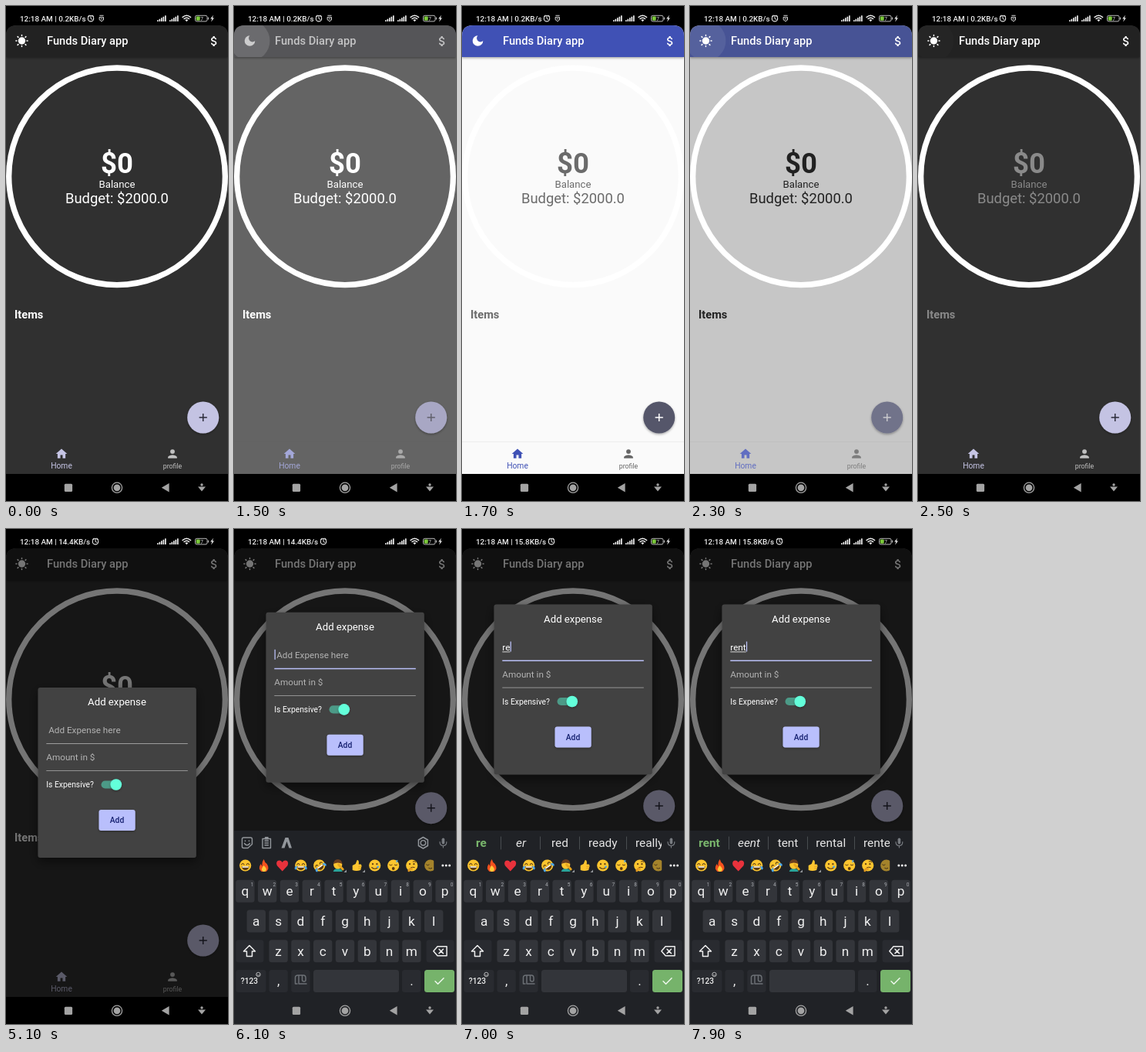
Recreate the animation shown at these times as an HTML page. Size 288x640 px, loop 8000 ms.

```html
<!DOCTYPE html>
<html lang="en">
<head>
<meta charset="utf-8">
<title>Expense app</title>
<style>
html, body { margin: 0; width: 100%; height: 100%; overflow: hidden; background: #000; }
svg { display: block; width: 100vw; height: 100vh; }
text { font-family: Roboto, "Noto Sans", sans-serif; white-space: pre; }
.mid { text-anchor: middle; }
.line { fill: none; stroke-linecap: round; stroke-linejoin: round; }
</style>
</head>
<body>
<svg id="stage" viewBox="0 0 288 640"></svg>
<script>
const LOOP = 8000;
const stage = document.getElementById('stage');

// markup helpers
const label = (x, y, size, str, attrs = '') => `<text x="${x}" y="${y}" font-size="${size}" ${attrs}>${str}</text>`;
const box = (x, y, w, h, r, fill, attrs = '') => `<rect x="${x}" y="${y}" width="${w}" height="${h}" rx="${r}" fill="${fill}" ${attrs}/>`;
const dot = (x, y, r, fill, attrs = '') => `<circle cx="${x}" cy="${y}" r="${r}" fill="${fill}" ${attrs}/>`;
const line = (d, color, width = 1, attrs = '') => `<path class="line" d="${d}" stroke="${color}" stroke-width="${width}" ${attrs}/>`;
const shape = (d, fill, attrs = '') => `<path d="${d}" fill="${fill}" ${attrs}/>`;
const group = (x, y, body, attrs = '') => `<g transform="translate(${x} ${y})" ${attrs}>${body}</g>`;
const icon = (id, x, y, d) => `<path id="${id}" d="${d}" transform="translate(${x} ${y}) scale(.733) translate(-12 -12)"/>`;
const repeat = (n, fn) => Array.from({ length: n }, (_, i) => fn(i)).join('');

// status bar
const bars = x => repeat(5, i => box(x + i * 2.5, 18.3 - i * 1.5, 1.7, 1.7 + i * 1.5, .3, '#eee'));
const statusBar = `
  ${label(18, 19.8, 9.9, '', 'id="clock" fill="#eee" font-weight="500"')}
  <g id="alarm">${line('M110 13.6V16.4L112 17.4M106.2 13.6L108 12M113.8 13.6L112 12', '#eee', 1)}
    ${dot(110, 16.2, 3.7, 'none', 'stroke="#eee" stroke-width="1.1"')}</g>
  <g id="badge">${line('M121.8 12.3H126.2M121.5 14.5H126.5V18L124 19.8L121.5 18ZM123 16.7H125', '#ddd', 1)}</g>
  ${bars(196)}${bars(212)}
  ${line('M229 14.6Q234.3 10 239.6 14.6M231 16.6Q234.3 13.9 237.6 16.6', '#eee', 1.4)}
  ${shape('M232.3 18L234.3 20.2L236.3 18Q234.3 16.6 232.3 18Z', '#eee')}
  ${box(245.5, 12.3, 15.5, 7.6, 2, 'none', 'stroke="#bbb"')}${box(246.7, 13.5, 5, 5.2, 1, '#7cc93c')}
  ${box(261.8, 14.6, 1.2, 3, .4, '#bbb')}${label(254, 18.6, 6.5, '7', 'fill="#ddd" class="mid"')}
  ${shape('M269 11.8L265.2 16.6H267.4L266 20.4L270 15.4H267.8Z', '#eee')}`;

// main screen
const sun = dot(0, 0, 4.7, '#fff') + line(repeat(8, i => {
  const c = Math.cos(i * Math.PI / 4), s = Math.sin(i * Math.PI / 4);
  return `M${c * 6.5} ${s * 6.5}L${c * 7.6} ${s * 7.6}`;
}), '#fff', 1.5);
const moon = shape('M0 -6.8A6.8 6.8 0 1 0 6.8 0A4.2 4.2 0 1 1 0 -6.8Z', '#fff');
const HOME = 'M10 20v-6h4v6h5v-8h3L12 3 2 12h3v8z';
const PERSON = 'M12 12a4 4 0 1 0 0-8 4 4 0 0 0 0 8zm0 2c-2.67 0-8 1.34-8 4v2h16v-2c0-2.66-5.33-4-8-4z';
const DOLLAR = 'M11.8 10.9c-2.27-.59-3-1.2-3-2.15 0-1.09 1.01-1.85 2.7-1.85 1.78 0 2.44.85 2.5 2.1h2.21c-.07-1.72-1.12-3.3-3.21-3.81V3h-3v2.16c-1.94.42-3.5 1.68-3.5 3.61 0 2.31 1.91 3.46 4.7 4.13 2.5.6 3 1.48 3 2.41 0 .69-.49 1.79-2.7 1.79-2.06 0-2.87-.92-2.98-2.1h-2.2c.12 2.19 1.76 3.42 3.68 3.83V21h3v-2.15c1.95-.37 3.5-1.5 3.5-3.55 0-2.84-2.43-3.81-4.7-4.4z';
const app = `<g clip-path="url(#screen)">
  ${box(0, 25, 288, 580, 0, '#303030', 'id="page"')}
  ${dot(144, 220.3, 140.3, 'none', 'stroke="#fff" stroke-width="7.3"')}
  <g id="copy">
    ${label(144, 215.5, 36.6, '$0', 'class="mid" font-weight="700"')}
    ${label(144, 235, 13.2, 'Balance', 'class="mid"')}
    ${label(144, 255, 18.4, 'Budget: $2000.0', 'class="mid"')}
    ${label(11, 404, 14.66, 'Items', 'font-weight="700"')}
  </g>
  ${box(0, 564, 288, 41, 0, '#303030', 'id="tabs"')}
  ${box(0, 563, 288, 1, 0, '#000', 'id="tabEdge"')}
  <g id="homeTab" class="mid">${icon('homeIcon', 72, 579, HOME)}${label(72, 597.5, 10.3, 'Home')}</g>
  <g id="profileTab" class="mid">${icon('profileIcon', 216, 579, PERSON)}${label(216, 597.5, 8.8, 'profile')}</g>
  ${box(0, 25, 288, 41, 0, '#212124', 'id="bar" filter="url(#soft)"')}
  ${dot(20.5, 45, 26, '#fff', 'id="ripple" clip-path="url(#barClip)"')}
  <g id="barContent" fill="#fff">
    <g id="sun" transform="translate(20.5 45)">${sun}</g><g id="moon" transform="translate(20.5 45)">${moon}</g>
    ${label(53, 50.3, 14.66, 'Funds Diary app', 'font-weight="500"')}
    ${icon('money', 270, 45.5, DOLLAR)}
  </g>
  <g id="fab"><g filter="url(#soft)">${dot(0, 0, 20.5, '#c4c3e3', 'id="fabDisc"')}</g>
    ${dot(0, 0, 20.5, '#fff', 'id="fabRipple"')}
    <path id="plus" class="line" d="M-5.1 0H5.1M0 -5.1V5.1" stroke-width="1.5" style="stroke-linecap:butt"/></g>
  ${box(0, 25, 288, 580, 0, '#000', 'id="scrim"')}
</g>`;

const dialog = `<g id="dialog">
  ${box(41.5, 205, 205.3, 220, 3, '#424242', 'filter="url(#deep)"')}
  ${label(144, 228.3, 13.2, 'Add expense', 'class="mid" fill="#fff"')}
  ${label(55.2, 264, 11.73, 'Add Expense here', 'id="hint" fill="#b3b3b3"')}
  ${label(52.3, 264, 11.73, '', 'id="typed" fill="#fff"')}
  ${box(52.3, 266, 0, .8, 0, '#fff', 'id="composing"')}
  ${box(52.5, 253, 1.3, 13, 0, '#b9bff5', 'id="caret"')}
  ${box(52.3, 277, 183.5, .8, 0, '#b3b3b3', 'id="underline"')}
  ${label(52.3, 299, 11.73, 'Amount in $', 'fill="#b3b3b3"')}${box(52.3, 312.2, 183.5, .8, 0, '#a8a8a8')}
  ${label(52.3, 334, 10.3, 'Is Expensive?', 'fill="#fff"')}
  ${box(123.5, 325.4, 24, 10.2, 5.1, '#4c9a87')}${dot(142.8, 330.5, 7.3, '#64ffda', 'filter="url(#soft)"')}
  ${box(120.5, 363, 47.2, 27, 3, '#b9bffc', 'filter="url(#soft)"')}
  ${label(144, 380.2, 10.3, 'Add', 'class="mid" fill="#15206f" font-weight="500"')}
</g>`;

// emoji row
const INK = '#5a3a12', TEAR = '#4aa8f0';
const face = body => dot(0, 0, 7.6, '#fdc52f') + body;
const eyes = dot(-2.7, -1.8, 1.1, INK) + dot(2.7, -1.8, 1.1, INK);
const squint = line('M-5 -1Q-3.2 -4 -1.6 -1M1.6 -1Q3.2 -4 5 -1', INK, 1.1);
const grin = shape('M-5 1.2H5Q4 6 0 6Q-4 6 -5 1.2Z', INK) + box(-4.2, 1.2, 8.4, 1.5, .5, '#fff');
const tears = shape('M-5 0Q-10 3 -7 5.5Q-4.5 5 -5 0ZM5 0Q10 3 7 5.5Q4.5 5 5 0Z', TEAR);
const hand = 'M-5 0L-1 -2L1 -7Q4 -7 3 -1.5H6Q7.5 0 6.5 2L5.5 6Q0 8 -5 6Z';
const emojis = [
  face(squint + grin),
  shape('M0 -8Q1 -4 4 -2Q8 4 3 8H-3Q-8 4 -4 -2Q-3 0 -2 1Q-3 -4 0 -8Z', '#f4511e') + shape('M0 0Q6 6 1 8H-1Q-5 5 0 0Z', '#ffca3a'),
  shape('M0 7.5L-6.6 .5C-10 -6 -3 -9 0 -4C3 -9 10 -6 6.6 .5Z', '#e8323c'),
  face(squint + grin + tears),
  `<g transform="rotate(-35)">${face(squint + grin + tears)}</g>`,
  shape('M-6 8Q-5 4 0 4Q5 4 6 8Z', '#28a39a') + dot(0, -1, 5.6, '#fdc52f') + shape('M-5.8 -2Q-5 -8 0 -8Q5 -8 5.8 -2Q0 -5 -5.8 -2Z', '#6b3f20') + line('M6.5 5L1 -1', '#e6a51f', 3),
  shape(hand, '#fdc52f') + line('M2.8 1.3H6.5M2.8 3.7H6', '#d99a1f', .7),
  face(eyes + line('M-4 2.5Q0 6 4 2.5', INK, 1.1) + dot(3.8, 1.8, 1.4, TEAR)),
  face(line('M-5 -.8Q-3.3 .8 -1.6 -.8M1.6 -.8Q3.3 .8 5 -.8', INK, 1) + dot(0, 4, 1.9, INK) + label(3, -4, 6, 'z', `fill="${TEAR}" font-weight="700"`)),
  face(eyes + line('M-1.5 3Q1 1.5 3.5 2.5M1.5 -5Q3.5 -6 5 -4.5', INK, 1) + line('M-4 7L-2.5 4.5L0 4.5', '#e59b20', 2.6)),
  face(line('M-5 -1Q-3.3 1 -1.6 -1M-2 3.5Q0 5 2 3.5', INK, 1))
];

// keyboard, drawn with its top edge at y = 0
const key = (x, y, ch) => box(x - 12.2, y - 14.5, 24.4, 29, 3.5, '#33353a') + label(x, y + 6, 17.2, ch, 'class="mid" fill="#f1f1f1"');
const row = (chars, x0, y) => repeat(chars.length, i => key(x0 + 28.8 * i, y, chars[i]));
const GREY = '#92969b';
const mic = box(269.6, 9.5, 3.6, 8, 1.8, '#777b80') + line('M267 14.5Q267 19.5 271.4 19.5Q275.8 19.5 275.8 14.5M271.4 19.5V22', '#777b80', 1.2);
const keyboard = `<g id="keyboard">
  ${box(0, 0, 288, 250, 0, '#202226')}
  <g id="tools">
    ${line('M10.5 11V20.5Q10.5 22.5 12.5 22.5H18L23.5 17.5V11Q23.5 9 21.5 9H12.5Q10.5 9 10.5 11ZM13.5 16.5Q17 21 20.5 16.5M14.5 13V13.6M19.5 13V13.6', GREY, 1.4)}
    ${line('M37 10.5H47.5V22.5H37ZM40 13.3H44.5M40 16H44.5M40 18.8H44.5', GREY, 1.4)}${box(39.8, 8, 5, 3.4, 1, GREY)}
    ${shape('M66.5 9H70.5L75 22.5H71.5L68.5 14L65.5 22.5H61.5Z', GREY)}
    ${line('M245.4 8.5L251.4 12V19.5L245.4 23L239.4 19.5V12Z', GREY, 1.5)}${dot(245.4, 15.8, 3.2, 'none', `stroke="${GREY}" stroke-width="1.4"`)}
  </g>
  <g id="suggestions">
    ${line([50.5, 101.5, 152.5, 213.5].map(x => `M${x} 8V24`).join(''), '#55585c', .8)}
    <g clip-path="url(#wordClip)">${[25, 76.5, 127, 182.7, 225].map((x, i) => label(x, 21, 15.4, '',
      `class="word${i < 4 ? ' mid' : ''}" fill="${i ? '#e6e6e6' : '#79b56c'}" ${i ? '' : 'font-weight="700"'} ${i === 1 ? 'font-style="italic"' : ''}`)).join('')}</g>
  </g>
  ${mic}
  ${emojis.map((e, i) => group(14.7 + 24 * i, 45, e, i === 10 ? 'opacity=".6" clip-path="url(#edgeClip)"' : '')).join('')}
  ${[146, 170].map(x => shape(`M${x} 54V50.5L${x - 3.5} 54Z`, GREY)).join('')}
  ${repeat(3, i => dot(270.8 + 4.4 * i, 45, 1.5, '#eee'))}
  ${row('qwertyuiop', 14.4, 78.3)}
  ${repeat(10, i => label(23.5 + 28.8 * i, 71.5, 6.5, (i + 1) % 10, 'class="mid" fill="#a8abb0"'))}
  ${row('asdfghjkl', 28.8, 117)}${row('zxcvbnm', 57.6, 155.7)}
  ${box(2.5, 141.2, 36, 29, 3.5, '#292b30')}${box(249.5, 141.2, 36, 29, 3.5, '#292b30')}
  ${line('M20 148.5L12.5 156H16.5V162.5H23.5V156H27.5Z', '#eee', 1.5)}
  ${line('M264 149.8H276V161.8H264L258.8 155.8ZM266 153.2L271.4 158.6M271.4 153.2L266 158.6', '#eee', 1.5)}
  ${box(2.5, 180, 39, 29, 3.5, '#292b30')}${label(20, 198.3, 10.2, '?123', 'class="mid" fill="#eee" font-weight="500"')}
  ${dot(31.5, 186, 2.7, 'none', 'stroke="#ddd" stroke-width=".8"')}${line('M30 186.6Q31.5 188.4 33 186.6', '#ddd', .7)}
  ${box(45.4, 180, 24.4, 29, 3.5, '#292b30')}${label(57.6, 199.5, 17, ',', 'class="mid" fill="#eee"')}
  ${box(74.2, 180, 24.4, 29, 3.5, '#292b30')}
  ${line('M82 198H79.5V190Q79.5 187 83 187H90Q93 187 93 190.5V193Q93 195 91 195Q88.5 195 88.5 193V187.5M84 187.5V198H94', '#6c7075', 1.5)}
  ${box(103, 180, 111, 29, 3.5, '#33353a')}
  ${box(218, 180, 24.4, 29, 3.5, '#292b30')}${label(230.4, 199.5, 17, '.', 'class="mid" fill="#eee"')}
  ${box(247, 180, 39, 29, 3.5, '#76b36b')}${line('M261 194.8L264.5 198.2L272 190.8', '#eef7ec', 1.5)}
</g>`;

const systemBar = `${box(0, 605, 288, 35, 0, '#000', 'id="systemBack"')}
  ${box(75.8, 617.7, 10.3, 10.3, 1.5, '#a3a3a3')}
  ${dot(144, 622.8, 6.6, 'none', 'stroke="#a3a3a3" stroke-width="1.3"')}${dot(144, 622.8, 4.4, '#a3a3a3')}
  ${shape('M201.8 622.8L211.6 617V628.6Z', '#a3a3a3')}
  ${shape('M249 621.5H259L254 627.5Z', '#a3a3a3')}${dot(254, 619, 1.7, '#a3a3a3')}`;

const clip = (id, body) => `<clipPath id="${id}">${body}</clipPath>`;
const shadow = (id, dy, blur, alpha) => `<filter id="${id}" x="-30%" y="-30%" width="160%" height="170%"><feDropShadow dx="0" dy="${dy}" stdDeviation="${blur}" flood-opacity="${alpha}"/></filter>`;
stage.innerHTML = `<defs>
  ${clip('screen', '<path d="M0 605V39Q0 25 14 25H274Q288 25 288 39V605Z"/>')}
  ${clip('barClip', box(0, 25, 288, 41, 0, '#000'))}${clip('wordClip', box(0, 0, 259, 34, 0, '#000'))}
  ${clip('edgeClip', box(-8, -9, 12.5, 18, 0, '#000'))}
  ${shadow('soft', 1.3, 1.6, .35)}${shadow('deep', 5, 7, .5)}
  </defs>${box(0, 0, 288, 640, 0, '#000')}${statusBar}${app}${dialog}${keyboard}${systemBar}`;

// animation
const el = Object.fromEntries([...stage.querySelectorAll('[id]')].map(n => [n.id, n]));
const words = [...stage.querySelectorAll('.word')];
const set = (id, attrs) => { for (const k in attrs) el[id].setAttribute(k, attrs[k]); };
const show = (id, on) => set(id, { opacity: +on });
const ramp = (t, a, b) => Math.min(1, Math.max(0, (t - a) / (b - a)));
const easeOut = x => 1 - (1 - x) ** 3;
const lerp = (a, b, k) => a + (b - a) * k;
const mix = (a, b, k) => {
  const part = (c, i) => parseInt(c.slice(1 + 2 * i, 3 + 2 * i), 16);
  return '#' + [0, 1, 2].map(i => Math.round(lerp(part(a, i), part(b, i), k)).toString(16).padStart(2, '0')).join('');
};

const KEY_TIMES = [6620, 6920, 7220, 7520];
const SUGGESTIONS = [
  ['r', 're', 'are', 'right', 'really'],
  ['re', 'er', 'red', 'ready', 'really'],
  ['ren', 'en', 'ten', 'rent', 'rental'],
  ['rent', 'eent', 'tent', 'rental', 'rente']
];

function drawTheme(t) {
  const k = ramp(t, 1450, 1650) - ramp(t, 2250, 2450);
  const ink = ramp(t, 1600, 1752) - ramp(t, 2430, 2580);
  const page = mix('#303030', '#fafafa', k);
  const bar = k < .25 ? mix('#212124', '#545457', k * 4) : mix('#545457', '#3f51b5', (k - .25) / .75);
  set('page', { fill: page });
  set('tabs', { fill: page });
  set('tabEdge', { opacity: .05 * k });
  set('bar', { fill: bar });
  set('barContent', { opacity: 1 - .35 * Math.max(0, 1 - Math.abs(k - .25) * 4) });
  set('copy', { fill: mix('#ffffff', '#212121', ink) });
  set('homeTab', { fill: mix('#c5c4e4', '#3f51b5', k) });
  set('profileTab', { fill: mix('#c0c0c0', '#666666', k) });
  set('fabDisc', { fill: mix('#c4c3e3', '#55576b', k) });
  set('plus', { stroke: mix('#2b2b3a', '#ffffff', k) });
  const light = t >= 1450 && t < 2250;
  show('moon', light);
  show('sun', !light);
  const pulse = a => ramp(t, a, a + 120) * (1 - ramp(t, a + 130, a + 290));
  set('ripple', { opacity: .13 * (pulse(1370) + pulse(2230)), r: 26 });
}

function drawDialog(t) {
  const open = ramp(t, 3150, 3350);
  set('fabRipple', { opacity: .3 * ramp(t, 2980, 3100) * (1 - ramp(t, 3150, 3400)), r: 20.5 * easeOut(ramp(t, 2980, 3180)) });
  set('scrim', { opacity: .54 * open });
  const lift = easeOut(ramp(t, 5830, 6330));
  set('dialog', { opacity: open, transform: `translate(0 ${-107.5 * lift})` });
  set('fab', { transform: `translate(255.7 ${lerp(532, 358, easeOut(ramp(t, 5830, 6190)))})` });

  const typed = 'rent'.slice(0, KEY_TIMES.filter(k => t >= k).length);
  const focused = t >= 5780;
  el.typed.textContent = typed;
  const width = typed ? el.typed.getComputedTextLength() : 0;
  const lastKey = typed ? KEY_TIMES[typed.length - 1] : 5900;
  show('hint', !typed);
  set('composing', { width });
  set('caret', { x: 52.5 + width, opacity: +(focused && Math.floor(Math.max(0, t - lastKey) / 500) % 2 === 0) });
  set('underline', { height: focused ? 1.5 : .8, fill: focused ? '#b9bff5' : '#b3b3b3' });
  return typed.length;
}

function drawKeyboard(t, count) {
  const rise = easeOut(ramp(t, 5800, 6080));
  set('keyboard', { transform: `translate(0 ${lerp(640, 390, rise)})` });
  set('systemBack', { fill: t >= 5800 ? '#202226' : '#000' });
  show('tools', !count);
  show('suggestions', count);
  words.forEach((w, i) => { w.textContent = count ? SUGGESTIONS[count - 1][i] : ''; });
}

function drawStatus(t) {
  const rate = t < 3500 ? '0.2' : t < 7000 ? '14.4' : '15.8';
  el.clock.textContent = `12:18 AM | ${rate}KB/s`;
  set('alarm', { transform: `translate(${t < 3500 ? 0 : 6} 0)` });
  show('badge', t < 3500);
}

function frame() {
  const t = performance.now() % LOOP;
  drawStatus(t);
  drawTheme(t);
  drawKeyboard(t, drawDialog(t));
  requestAnimationFrame(frame);
}
frame();
</script>
</body>
</html>
```
